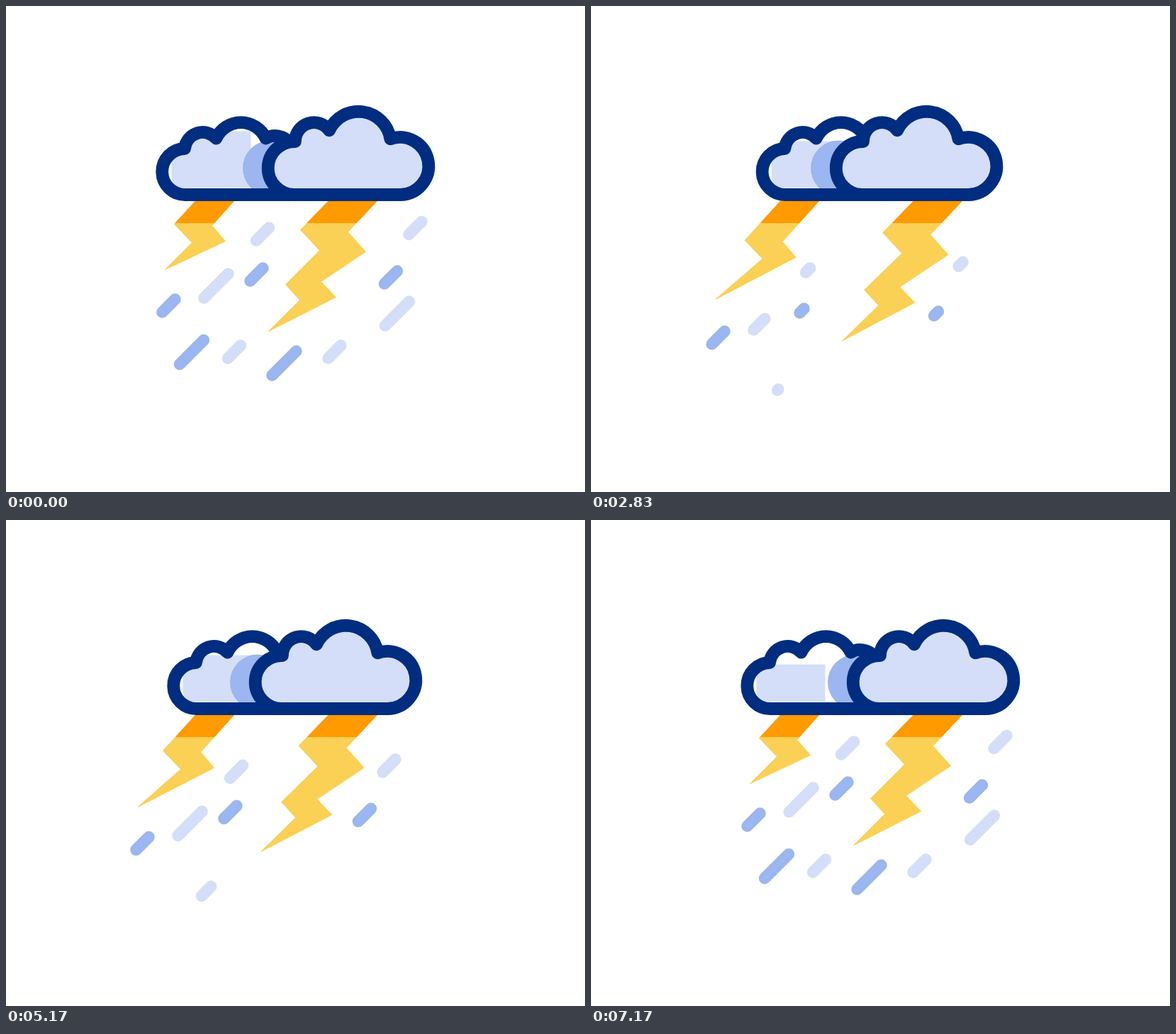
Animation of 817 by 685 pixels, one loop 7.21 s. Source, as an HTML page with a canvas:

```html
<!DOCTYPE html>
<html lang="en">
<head>
<meta charset="utf-8">
<title>Thunderstorm</title>
<style>
html, body { margin: 0; width: 100%; height: 100%; overflow: hidden; background: #fff; }
canvas { display: block; }
</style>
</head>
<body>
<canvas id="stage" width="817" height="685"></canvas>
<script>
const ctx = document.getElementById('stage').getContext('2d');
const LOOP = 7210, CYCLE = 72;
const NAVY = '#002d80', PALE = '#d4def8', BLUE = '#9bb6f0', YELLOW = '#fad055', ORANGE = '#ff9a00';

const clamp = v => Math.min(1, Math.max(0, v));
const lerp = (a, b, p) => a + (b - a) * p;
const ease = p => p < .5 ? 2 * p * p : 1 - 2 * (1 - p) * (1 - p);

// Eased value through [frame, value] keys
function track(t, ...keys) {
  const next = keys.findIndex(([at]) => t <= at);
  if (next < 0) return keys[keys.length - 1][1];
  if (next === 0) return keys[0][1];
  const [t0, a] = keys[next - 1], [t1, b] = keys[next];
  return lerp(a, b, ease((t - t0) / (t1 - t0)));
}

const leftCloud = new Path2D('M253 265.5A32.5 32.5 0 0 1 251.6 200.5A25.5 25.5 0 0 1 296 186' +
  'A38.5 38.5 0 0 1 366 186A26.5 26.5 0 0 1 400 192.5A36.5 36.5 0 0 1 400 265.5Z');
const rightCloud = new Path2D('M406 265.5A37.5 37.5 0 1 1 407.5 190.5A26.5 26.5 0 0 1 455.6 174.8' +
  'A45.5 45.5 0 0 1 541.9 186.8A40.5 40.5 0 1 1 556 265.5Z');

// Bolt outlines run down the left side to the tip and back up the right
const smallBolt = [[271, 270], [237, 307], [262, 333], [224, 371], [309, 331], [290, 309], [325, 270]];
const bigBolt = [[459, 270], [415, 315], [442, 344], [394, 392], [414, 414], [370, 458],
  [465, 410], [444, 388], [507, 346], [482, 318], [527, 270]];
// How far each level of kinks stretches, root first
const stretch = [[0, 0], [-18, 20], [-43, 37], [-78, 66]];

// A drop rests at x, y; lower drops run later in the cycle
const SHORT = 9, LONG = 17;
const drop = (color, x, y, half, late = 0) =>
  ({ color, x, y, half, delay: Math.max(0, (y - 390) / 10.2) + late });
const drops = [
  drop(PALE, 361.5, 321, SHORT), drop(PALE, 577, 312.5, SHORT), drop(PALE, 296, 394, LONG),
  drop(PALE, 463, 487, SHORT), drop(PALE, 551.5, 433, LONG, 9), drop(PALE, 321.5, 487, SHORT, 7.2),
  drop(BLUE, 353, 378, SHORT), drop(BLUE, 542.5, 382, SHORT), drop(BLUE, 229, 422, SHORT),
  drop(BLUE, 261.5, 487.5, LONG), drop(BLUE, 392, 503, LONG)
];

// Three falls per cycle: visible span and sideways slide from the resting place
const SPEED = 2.45;
const falls = [
  { start: () => -9, end: d => (14 + d) % 17.5, slide: t => -37 * Math.pow(t / 11, 1.8), drift: 0 },
  { start: d => 16 + d, end: d => 29.7 + d, slide: t => SPEED * (28.3 - t), drift: 2.5 },
  { start: d => 43.9 + 1.1 * d, end: () => 99, slide: t => SPEED * Math.max(0, 66 - t), drift: 0 }
];

function drawDrop(t, { color, x, y, half, delay }) {
  for (const { start, end, slide, drift } of falls) {
    const from = start(delay), to = end(delay);
    if (t < from || t >= to) continue;
    const dx = slide(t), cx = x + dx, cy = y - .9 * dx + drift;
    // The lower end grows in, then the upper end catches up
    const head = lerp(half, -half, clamp((t - from) / 4 + .01));
    const tail = lerp(half, -half, clamp((t - to) / 3 + 1));
    ctx.strokeStyle = color;
    ctx.lineWidth = 16.5;
    ctx.beginPath();
    ctx.moveTo(cx + tail, cy - tail);
    ctx.lineTo(cx + head, cy - head);
    ctx.stroke();
  }
}

function drawBolt(corners, reach) {
  const shape = new Path2D(), last = corners.length - 1;
  corners.forEach(([x, y], i) => {
    const [dx, dy] = stretch[Math.ceil(Math.min(i, last - i) / 2)];
    shape.lineTo(x + dx * reach, y + dy * reach);
  });
  shape.closePath();
  const paint = color => {
    ctx.fillStyle = ctx.strokeStyle = color;
    ctx.lineWidth = 1;
    ctx.fill(shape);
    ctx.stroke(shape);
  };
  paint(YELLOW);
  ctx.save();
  ctx.beginPath();
  ctx.rect(0, 260, 817, 45.5);
  ctx.clip();
  paint(ORANGE);
  ctx.restore();
}

function drawCloud(path, shift, paint) {
  ctx.save();
  ctx.translate(shift, 0);
  ctx.save();
  ctx.clip(path);
  paint();
  ctx.restore();
  ctx.strokeStyle = NAVY;
  ctx.lineWidth = 17.8;
  ctx.stroke(path);
  ctx.restore();
}

// The tint of the left cloud comes and goes behind a moving edge
function drawTint(t) {
  const top = track(t, [0, 176], [11, 190], [44, 180], [64, 190], [71, 203]);
  const edge = t < 24 ? 345 : t < 41 ? 233 : t < 58 ? 440 : 330;
  ctx.fillStyle = PALE;
  ctx.beginPath();
  ctx.roundRect(233, top, edge - 233, 256 - top, [16, 0, 0, 16]);
  ctx.fill();
}

function draw(t) {
  const left = track(t, [0, 0], [22, 32], [41, -50], [62, 0]);
  const right = track(t, [0, 0], [22, -36], [41, 39], [62, 0]);

  ctx.setTransform(1, 0, 0, 1, 0, 0);
  ctx.fillStyle = '#fff';
  ctx.fillRect(0, 0, 817, 685);
  ctx.translate(.5, .5);
  ctx.lineCap = ctx.lineJoin = 'round';

  drops.forEach(d => drawDrop(t, d));
  drawBolt(smallBolt, track(t, [0, 0], [20.5, 1.55], [23.5, 1.55], [44, 0]));
  drawBolt(bigBolt, track(t, [2.5, 0], [36, 1.04], [54, 0]));

  drawCloud(leftCloud, left, () => {
    ctx.fillStyle = '#fff';
    ctx.fill(leftCloud);
    drawTint(t);
    ctx.fillStyle = BLUE;
    ctx.beginPath();
    ctx.arc(372.5 + right - left, 228, 39, 0, 7);
    ctx.fill();
  });
  drawCloud(rightCloud, right, () => {
    ctx.fillStyle = PALE;
    ctx.fill(rightCloud);
  });
}

const begin = performance.now();
function tick() {
  const ms = Math.max(0, performance.now() - begin) % LOOP;
  draw(Math.floor(ms * .03 + .2) % CYCLE);
  requestAnimationFrame(tick);
}
tick();
</script>
</body>
</html>
```
